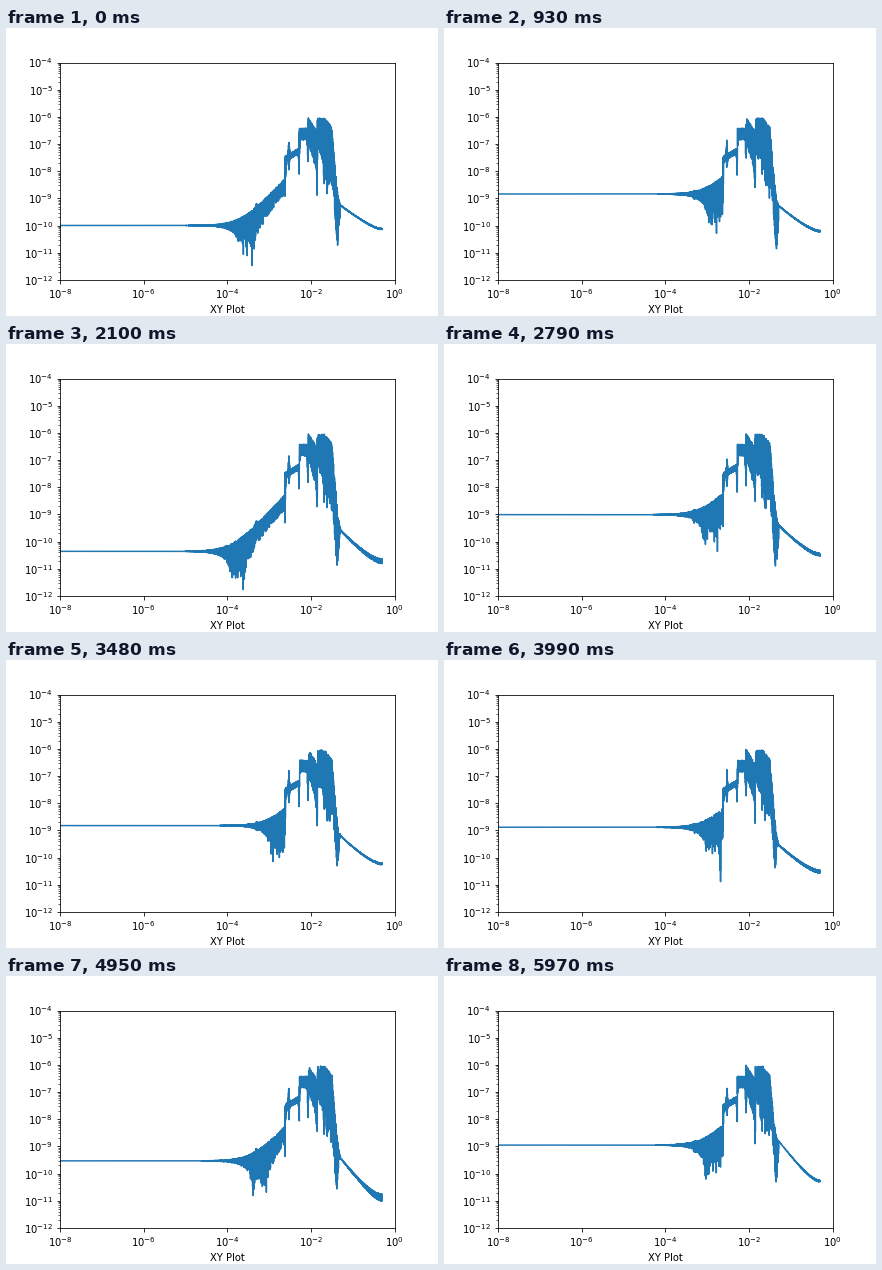
These frames come from a looping animation (432 by 288 pixels, 6 s). A matplotlib script:

```python
import numpy as np
import matplotlib.pyplot as plt
from matplotlib.animation import FuncAnimation
from matplotlib.ticker import LogLocator

FRAMES, INTERVAL = 200, 30
STEP, TAIL = -2.624, -1.297  # log10 frequency where the regions meet

# Key points of the drift: phase of the flat level, tail end, tail curvature
KEYS = np.array([0, 31, 70, 116, 150, 165, 199])
PHASE = np.array([1.506, 0.348, 1.543, 0.22, 0.907, 1.38, 0.761])
END = [-10.12, -10.2, -10.71, -10.23, -10.79, -10.86, -10.27]
BEND = [0.03, 0.07, 0.21, 0.13, 0.06, 0.61, 0.7]
TURNS = np.pi * np.round(0.3 * KEYS)

# Narrow downward spikes: log10 frequency, depth in decades
DIPS = [(STEP, 1.8), (-2.53, 0.45), (-2.285, 0.85), (-2.075, 1.1),
        (-1.86, 0.8), (-1.69, 0.7), (-1.62, 0.6)]

PER_PIXEL = 16
x = np.arange(-5, np.log10(0.5), 1 / (PER_PIXEL * 41.85))
x = np.concatenate([[-9], x, [np.log10(0.5)]])
freq = 10 ** x
column = np.arange(x.size) // PER_PIXEL
left, right = x < STEP, x > TAIL
mid = ~left & ~right


def spike(center, width=0.012):
    return np.exp(-np.abs((x - center) / width) ** 1.5)


def ramp(start):
    return np.maximum(x - start, 0)


def band_edges():
    zones = [x < -2.28, x < -2.08, x < -1.85]
    top = np.select(zones, [-7.45 + 0.9 * (x - STEP), -6.42,
                            -6.0 - 2.4 * ramp(-2.08)], -6.05)
    width = np.select(zones, [0.2, 0.42, 0.85 + 2.5 * ramp(-2.08)],
                      1 + 3.5 * ramp(-1.85))
    top = top - 2 * ramp(-1.67) - 17 * ramp(-1.505)
    low = top - np.minimum(width, 2)
    for center, depth in DIPS:
        low -= depth * spike(center)
    return top + 0.65 * spike(-2.53), low


TOP, LOW = band_edges()


def spectrum(frame):
    rng = np.random.default_rng(frame)
    phase = np.interp(frame, KEYS, PHASE + TURNS)
    level = 1.55e-9 * abs(np.cos(phase)) + 1e-12
    end = 10 ** np.interp(frame, KEYS, END)
    bend = np.interp(frame, KEYS, BEND)
    wave = np.cos(rng.uniform(0, 2 * np.pi, x.size))

    # Flat level plus leakage of alternating sign
    leak = 5.3e-9 * 10 ** (1.65 * (x - STEP)) * (1 + 0.4 * spike(-3.31, 0.03))
    leak *= 0.65 + 0.35 * wave
    sign = rng.choice([-1, 1], x.size)
    y = np.abs(level + sign * leak * np.exp(0.25j * rng.normal(size=x.size)))

    # Smooth tail
    s = np.sin(np.pi * freq)
    tail = end * (1 - bend + bend / s) / s
    y[right] = (tail + 4e-12 * wave / s ** 0.6)[right]

    # Filled band with a wandering notch at its right end
    notch = rng.normal(-1.365, 0.012)
    floor = rng.normal(-10.8, 0.35) + 20 * np.abs(x - notch)
    drops = np.abs(rng.normal(size=column[-1] + 1))[column]
    low = LOW - 0.25 * drops * np.clip((x + 2.05) / 0.4, 0, 1)
    low = np.where(x > -1.5, np.maximum(low, floor), low)
    top = np.log10(10 ** TOP + tail * (x > -1.5))
    low = np.minimum(low, top)
    y[mid] = 10 ** (low + (top - low) * (1 + wave) / 2)[mid]
    return y


fig = plt.figure(figsize=(6, 4), dpi=72, facecolor="white")
fig.subplots_adjust(left=0.125, right=0.9, bottom=0.125, top=0.88)
ax = fig.add_subplot()
ax.set_xscale("log")
ax.set_yscale("log")
ax.set_xlim(1e-8, 1)
ax.set_ylim(1e-12, 1e-4)
ax.set_xticks(10.0 ** np.arange(-8, 1, 2))
ax.set_xticks([], minor=True)
ax.set_yticks(10.0 ** np.arange(-12, -3))
ax.yaxis.set_minor_locator(LogLocator(subs=np.arange(2, 10), numticks=99))
ax.yaxis.set_minor_formatter("")
ax.set_xlabel("XY Plot")
line, = ax.plot(freq, spectrum(0), color="C0", lw=1.5)


def update(frame):
    line.set_ydata(spectrum(frame))
    return line,


anim = FuncAnimation(fig, update, frames=FRAMES, interval=INTERVAL,
                     repeat=True, repeat_delay=0)
plt.show()
```
